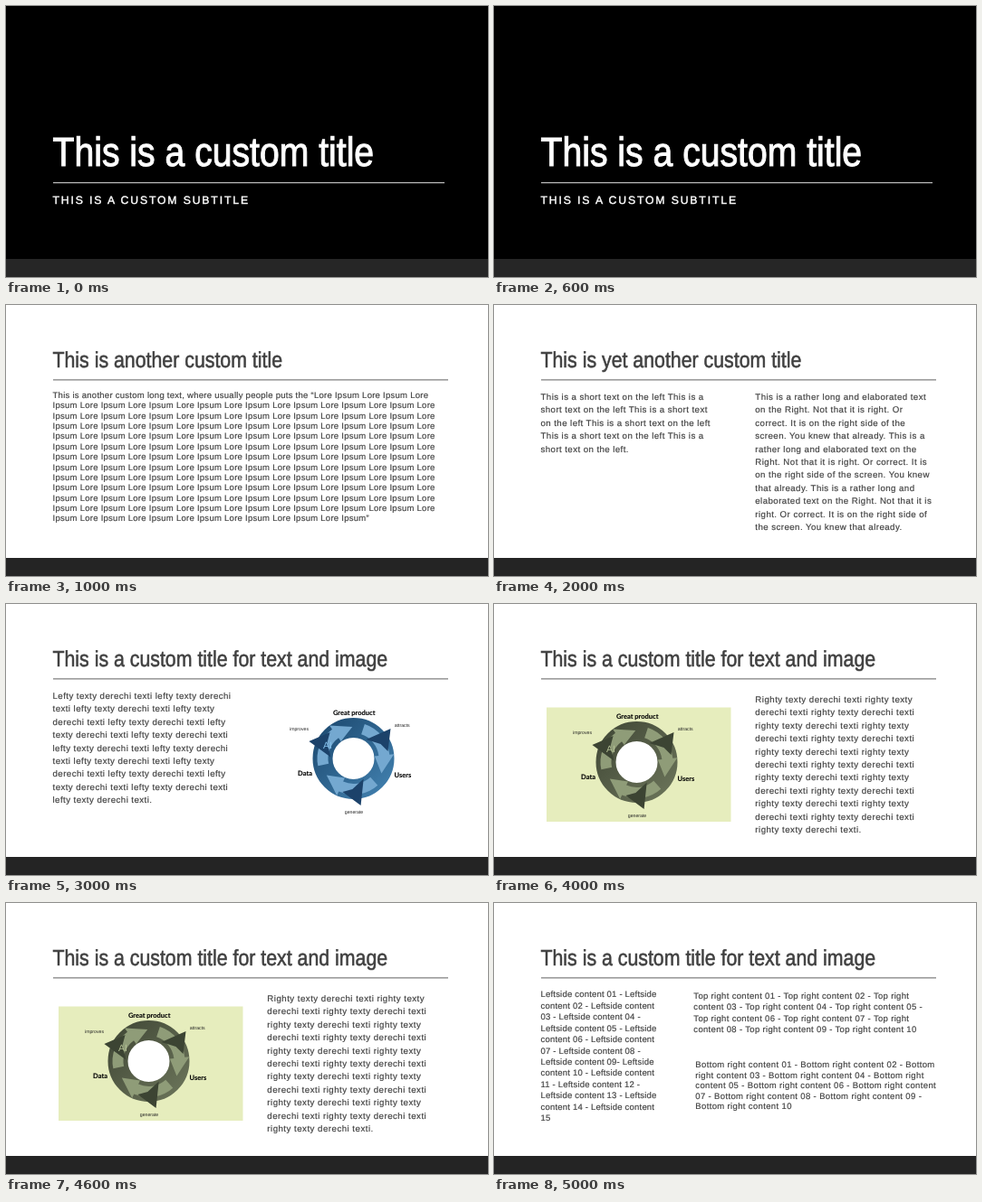
These frames come from a looping animation (532x300 px, 6 s). An HTML page:

```html
<!DOCTYPE html>
<html lang="en">
<head>
<meta charset="utf-8">
<title>Slide layouts</title>
<style>
  html, body { margin: 0; width: 100%; height: 100%; overflow: hidden; background: #000; }
  svg { display: block; width: 100vw; height: 100vh; }
  text { font-family: "Liberation Sans", Arial, sans-serif; white-space: pre; text-rendering: geometricPrecision; }
  .title { fill: #404040; stroke: #404040; stroke-width: .024em; }
  .cover .title { fill: #fff; stroke: #fff; }
  .body { fill: #404040; stroke: #404040; stroke-width: .018em; }
  .strong { font: bold 7.5px Lato, sans-serif; text-anchor: middle; fill: #000; stroke: #000; stroke-width: .1px; }
  .small { font-size: 5.2px; text-anchor: middle; fill: #222; }
</style>
</head>
<body>
<svg id="stage" viewBox="0 0 532 300" preserveAspectRatio="none"></svg>
<script>
const HOLD = 1000;
const CONDENSED = 0.87;

const rect = (x, y, w, h, fill) =>
  `<rect x="${x}" y="${y}" width="${w}" height="${h}" fill="${fill}"/>`;

const title = (text, y, size) =>
  `<text class="title" transform="translate(51.5 ${y}) scale(${CONDENSED} 1)" font-size="${size}">${text}</text>`;

function block(lines, x, y, pitch, size, spacing) {
  return lines.map((line, i) =>
    `<text class="body" x="${x}" y="${y + i * pitch}" font-size="${size}" letter-spacing="${spacing}">${line}</text>`
  ).join('');
}

function wrap(text, limit) {
  const lines = [''];
  for (const word of text.split(' ')) {
    const last = lines.length - 1;
    const joined = lines[last] ? lines[last] + ' ' + word : word;
    if (joined.length <= limit) lines[last] = joined;
    else lines.push(word);
  }
  return lines;
}

function repeated(phrase, count) {
  const text = Array(count).fill(phrase).join(' ') + '.';
  return text[0].toUpperCase() + text.slice(1);
}

const page = (heading, content) =>
  rect(0, 0, 532, 300, '#fff') + rect(0, 280, 532, 20, '#242424') +
  title(heading, 68.7, 24.5) + rect(52, 82.4, 436, 1, '#606060') + content;

// Points on the ring, in degrees clockwise from the right.
const polar = (r, deg) => {
  const a = deg * Math.PI / 180;
  return `${(r * Math.cos(a)).toFixed(2)} ${(r * Math.sin(a)).toFixed(2)}`;
};

function ringArrow(from, tip) {
  const neck = tip - 34;
  return `M${polar(28, from)}A28 28 0 0 1 ${polar(28, neck)}L${polar(23.5, neck)}` +
    `L${polar(35, tip)}L${polar(45, neck)}L${polar(40, neck)}A40 40 0 0 0 ${polar(40, from)}Z`;
}

function cycle(id, x, y, { dark, mid, light, spike, letters }) {
  const turns = [0, 120, 240];
  const arrows = turns.map(t => ringArrow(168 + t, 268 + t)).join('');
  const spikes = turns.map(t =>
    `<path transform="rotate(${t})" d="M41 -33L38 -8L30 -16L14 -21Z" fill="${spike}"/>`).join('');
  const label = (cls, dx, dy, text) => `<text class="${cls}" x="${dx}" y="${dy}">${text}</text>`;
  return `<g transform="translate(${x} ${y})">
    <linearGradient id="${id}" x1="0" y1="0" x2="1" y2="1">
      <stop offset="0" stop-color="${dark}"/><stop offset="1" stop-color="${mid}"/>
    </linearGradient>
    <circle r="34" fill="#fff" stroke="url(#${id})" stroke-width="22"/>
    <path d="${arrows}" fill="${light}"/>${spikes}
    <text x="-33.5" y="-11.5" font-size="10.5" fill="${letters}">AI</text>
    ${label('strong', .7, -47.7, 'Great product')}
    ${label('strong', -53.5, 18.9, 'Data')}
    ${label('strong', 54.5, 20.9, 'Users')}
    ${label('small', -60, -31, 'improves')}
    ${label('small', 53.7, -35, 'attracts')}
    ${label('small', .5, 61, 'generate')}
  </g>`;
}

const blue = { dark: '#1f4d74', mid: '#3f7dab', light: '#74a8d0', spike: '#1c426a', letters: '#86c3ee' };
const olive = { dark: '#444b39', mid: '#687157', light: '#8f9c78', spike: '#3c4433', letters: '#b5c295' };

const loreLine = Array(8).fill('Ipsum Lore').join(' ');
const loreText = [
  'This is another custom long text, where usually people puts the “Lore Ipsum Lore Ipsum Lore',
  ...Array(11).fill(loreLine),
  'Ipsum Lore '.repeat(6) + 'Ipsum”'
];

const rightText = `This is a rather long and elaborated text
on the Right. Not that it is right. Or
correct. It is on the right side of the
screen. You knew that already. This is a
rather long and elaborated text on the
Right. Not that it is right. Or correct. It is
on the right side of the screen. You knew
that already. This is a rather long and
elaborated text on the Right. Not that it is
right. Or correct. It is on the right side of
the screen. You knew that already.`.split('\n');

const leftside = `Leftside content 01 - Leftside
content 02 - Leftside content
03 - Leftside content 04 -
Leftside content 05 - Leftside
content 06 - Leftside content
07 - Leftside content 08 -
Leftside content 09- Leftside
content 10 - Leftside content
11 - Leftside content 12 -
Leftside content 13 - Leftside
content 14 - Leftside content
15`.split('\n');

const topRight = `Top right content 01 - Top right content 02 - Top right
content 03 - Top right content 04 - Top right content 05 -
Top right content 06 - Top right content 07 - Top right
content 08 - Top right content 09 - Top right content 10`.split('\n');

const bottomRight = `Bottom right content 01 - Bottom right content 02 - Bottom
right content 03 - Bottom right content 04 - Bottom right
content 05 - Bottom right content 06 - Bottom right content
07 - Bottom right content 08 - Bottom right content 09 -
Bottom right content 10`.split('\n');

const imageTitle = 'This is a custom title for text and image';

const slides = [
  `<g class="cover">${rect(0, 0, 532, 300, '#000')}${rect(0, 280, 532, 20, '#262626')}
    ${title('This is a custom title', 177.3, 45)}${rect(52, 195.2, 432, 1, '#e6e6e6')}
    <text x="51.5" y="218.7" font-size="12.2" letter-spacing="1.88" fill="#fff" stroke="#fff" stroke-width=".45">THIS IS A CUSTOM SUBTITLE</text></g>`,

  page('This is another custom title', block(loreText, 51.5, 103, 11.36, 9.5, .27)),

  page('This is yet another custom title',
    block(wrap(repeated('This is a short text on the left', 6), 44), 51.5, 105, 14.4, 9.7, .42) +
    block(rightText, 288.3, 105, 14.4, 9.7, .44)),

  page(imageTitle,
    block(wrap(repeated('lefty texty derechi texti', 15), 45), 51.5, 105, 14.4, 9.7, .44) +
    cycle('ringBlue', 383.5, 171, blue)),

  page(imageTitle,
    rect(58, 114.5, 203.5, 126.5, '#e6edbd') + cycle('ringOlive', 157.5, 175, olive) +
    block(wrap(repeated('righty texty derechi texti', 16), 40), 288.3, 109, 14.4, 9.7, .48)),

  page(imageTitle,
    block(leftside, 51.5, 104.3, 12.45, 9.5, .2) +
    block(topRight, 220.3, 105.7, 12.4, 9.5, .33) +
    block(bottomRight, 222.3, 182.3, 11.4, 9.5, .36))
];

const stage = document.getElementById('stage');
stage.innerHTML = slides.map(s => `<g class="slide">${s}</g>`).join('');

const count = slides.length;
stage.querySelectorAll('.slide').forEach((slide, i) => {
  slide.animate([
    { opacity: 1, offset: 0, easing: 'step-end' },
    { opacity: 0, offset: 1 / count, easing: 'step-end' },
    { opacity: 0, offset: 1 }
  ], { duration: count * HOLD, delay: (i - count) * HOLD, iterations: Infinity });
});
</script>
</body>
</html>
```
